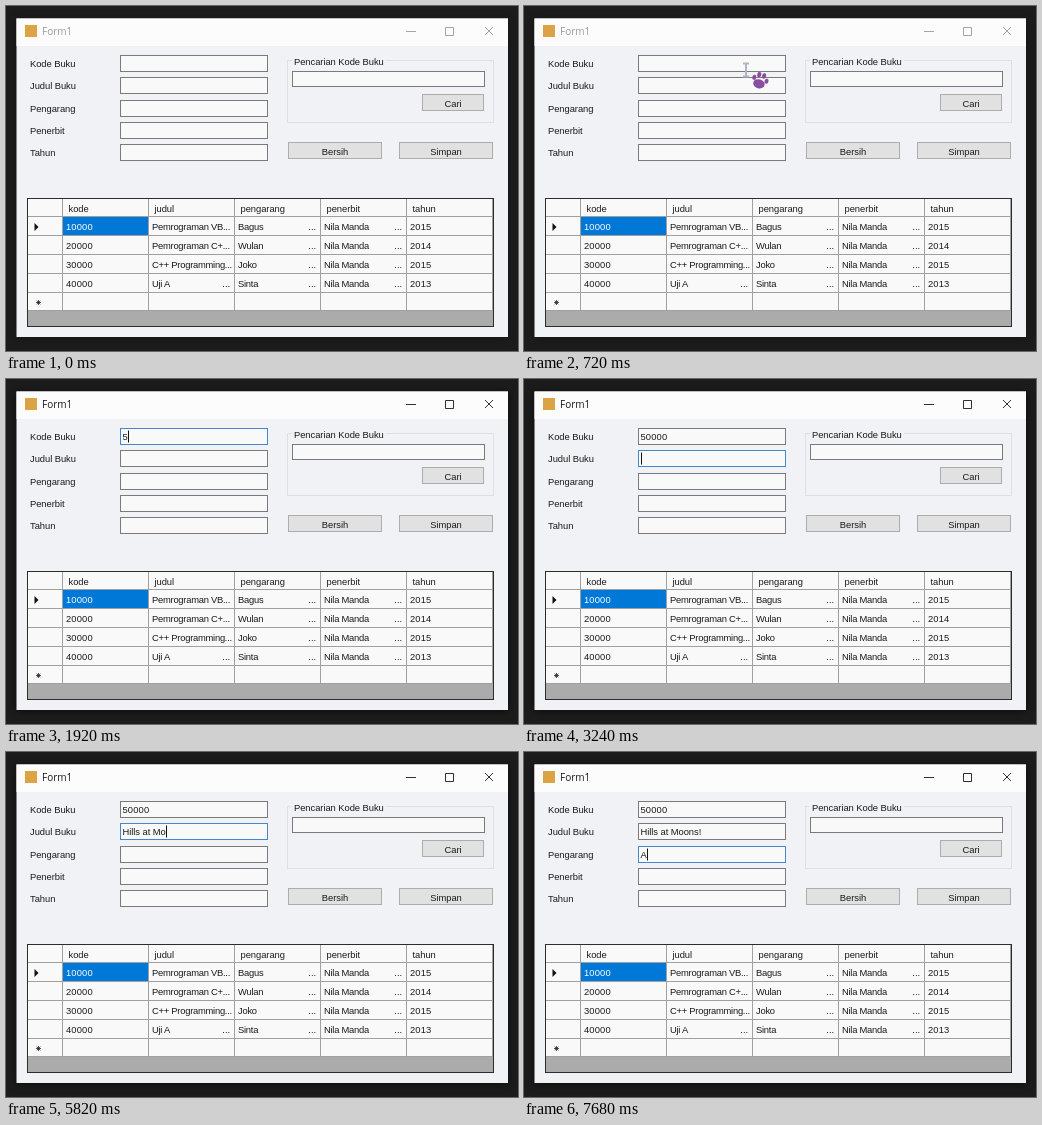
Animation, 512 px wide and 345 px high, one loop 8000 ms. Source, as an HTML page:

```html
<!DOCTYPE html>
<html lang="id">
<head>
<meta charset="utf-8">
<title>Form1</title>
<style>
html, body { margin: 0; width: 100%; height: 100%; overflow: hidden; background: #1c1c1c; }
svg { display: block; width: 512px; height: 345px; }
text { font: 9.4px "Liberation Sans", Arial, sans-serif; letter-spacing: -.05px; white-space: pre; fill: #1a1a1a; }
.cell { letter-spacing: -.25px; }
.num { letter-spacing: .15px; }
.title { font: 10px "Open Sans", "Noto Sans", sans-serif; letter-spacing: 0; }
</style>
</head>
<body>
<svg id="stage" viewBox="0 0 512 345"></svg>
<script>
const LOOP = 8000, STEP = 60, BLINK = 530;
const FORM = '#f0f2f5', PAPER = '#f9f9f9';
const stage = document.getElementById('stage');

function add(tag, attrs, parent = stage) {
  const el = document.createElementNS('http://www.w3.org/2000/svg', tag);
  for (const k in attrs) el.setAttribute(k, attrs[k]);
  return parent.appendChild(el);
}
const fillRect = (x, y, width, height, fill) => add('rect', { x, y, width, height, fill });
const box = (x, y, width, height, fill, stroke) =>
  add('rect', { x: x + .5, y: y + .5, width: width - 1, height: height - 1, fill, stroke });
const path = (d, attrs, parent) => add('path', { d, fill: 'none', ...attrs }, parent);
function text(x, y, content, attrs = {}) {
  const el = add('text', { x, y, ...attrs });
  el.textContent = content;
  return el;
}
function button(x, y, width, height, label) {
  box(x, y, width, height, '#e1e1e1', '#adadad');
  text(x + width / 2, y + 13, label, { 'text-anchor': 'middle' });
}

// Window frame
const frame = fillRect(10.5, 12.5, 491.5, 318.5, FORM);
fillRect(10.5, 12.5, 491.5, 27.5, '#fcfcfc');
fillRect(19, 19, 12, 12, '#dca344');
const title = text(36, 29, 'Form1', { class: 'title' });
const controls = path('M400 25.5h10M439.5 21.5h8v8h-8zM479 21l8 8M487 21l-8 8', { 'stroke-width': .9 });

// Input fields
const labels = ['Kode Buku', 'Judul Buku', 'Pengarang', 'Penerbit', 'Tahun'];
const fields = labels.map((label, i) => {
  const y = Math.round(49 + i * 22.25);
  text(24, y + 12, label);
  return {
    y,
    rect: box(114, y, 148, 17, PAPER, '#7a7a7a'),
    text: text(116.5, y + 12, '', i ? {} : { class: 'num' })
  };
});

// Search group and buttons
box(281, 54, 207, 63, 'none', '#dcdfe4');
fillRect(286, 50, 94, 10, FORM);
text(288, 58.5, 'Pencarian Kode Buku');
box(286, 65, 193, 16, PAPER, '#7a7a7a');
button(416, 88, 62, 17, 'Cari');
button(282, 136, 94, 17, 'Bersih');
button(393, 136, 94, 17, 'Simpan');

// Data grid
const cols = [56, 142, 228, 314, 400, 486];
const rows = [210, 229, 248, 267, 286, 304];
const data = [
  ['10000', 'Pemrograman VB...', 'Bagus', 'Nila Manda', '2015'],
  ['20000', 'Pemrograman C+...', 'Wulan', 'Nila Manda', '2014'],
  ['30000', 'C++ Programming...', 'Joko', 'Nila Manda', '2015'],
  ['40000', 'Uji A', 'Sinta', 'Nila Manda', '2013']
];
fillRect(21, 192, 467, 129, '#ababab');
fillRect(22, 193, 465, 111, PAPER);
fillRect(57, 211, 85, 18, '#0078d7');
path(cols.map(x => `M${x}.5 193V304`).join('') + rows.map(y => `M22 ${y}.5H487`).join(''),
  { stroke: '#a0a0a0' });
box(21, 192, 467, 129, 'none', '#2c2c2c');
['kode', 'judul', 'pengarang', 'penerbit', 'tahun'].forEach((name, c) =>
  text(cols[c] + 6.5, 205.5, name));
data.forEach((row, r) => row.forEach((value, c) => {
  const y = rows[r] + 14, number = c === 0 || c === 4;
  const el = text(cols[c] + 4, y, value, { class: number ? 'num' : 'cell' });
  if (!r && !c) el.style.fill = '#fff';
  if (!number && !value.endsWith('...'))
    text(cols[c + 1] - 4, y, '...', { 'text-anchor': 'end' });
}));
path('M28.5 217l4 4l-4 4z', { fill: '#111' });
path('M30 296.5h5M32.5 294v5M30.7 294.7l3.6 3.6M34.3 294.7l-3.6 3.6', { stroke: '#222', 'stroke-width': .8 });

const caret = fillRect(0, 0, 1, 12, '#111');

// Pointer: beam or arrow with a paw beside the hotspot
const pointer = add('g', {});
const beam = path('M-3-6.5H3M0-6.5V6.5M-3 6.5H3', { stroke: '#b2b4c6', 'stroke-width': 2 }, pointer);
const arrow = path('M0 0V15L3.5 11.8L6 17.5L8.3 16.5L6 11H10.5Z', { fill: '#fff', stroke: '#555', 'stroke-width': .8 }, pointer);
const paw = add('g', { fill: '#8a4d9f' }, pointer);
[[0, 4, 5.8, 4.6], [-6.2, -1, 2, 2.6], [-2.2, -5, 2, 2.8], [2.8, -5, 2, 2.8], [6.6, -.6, 2, 2.6]]
  .forEach(([cx, cy, rx, ry]) => add('ellipse', { cx, cy, rx, ry }, paw));

// Typing: when each field gains focus and when its keys land
const typing = [
  { focus: 1020, caretAt: 1200, value: '50000', keys: [1920, 2040, 2340, 2460, 2760] },
  { focus: 3000, caretAt: 3000, value: 'Hills at Moons!',
    keys: [3480, 3720, 4020, 4200, 4320, 4500, 4800, 5280, 5460, 5700, 5820, 6120, 6240, 6360, 6960] },
  { focus: 7260, caretAt: 7260, value: 'A', keys: [7680] }
];
// Pointer track: time, x, y
const track = [[60, 520, 50], [180, 470, 54], [300, 420, 62], [480, 312, 66], [660, 234, 65],
  [720, 222, 64], [840, 222, 60], [1080, 222, 60], [1320, 224, 20]];

const clamp = v => Math.max(0, Math.min(1, v));
const mix = (a, b, p) => `rgb(${a.map((v, i) => Math.round(v + (b[i] - v) * p))})`;
const gray = v => [v, v, v];
const FOCUS = [70, 134, 205];

function pointerAt(t) {
  const i = track.findIndex(k => k[0] > t);
  if (i < 0) return track[track.length - 1].slice(1);
  if (i === 0) return track[0].slice(1);
  const [t0, x0, y0] = track[i - 1], [t1, x1, y1] = track[i], p = (t - t0) / (t1 - t0);
  return [x0 + (x1 - x0) * p, y0 + (y1 - y0) * p];
}

function drawPointer(t) {
  const [x, y] = pointerAt(t);
  const inside = (left, top, width) => x >= left && x <= left + width && y >= top && y <= top + 17;
  const onText = inside(114, 49, 148) || inside(286, 65, 193);
  pointer.setAttribute('transform', `translate(${Math.round(x)} ${Math.round(y)})`);
  pointer.style.display = t >= 120 && t < 1920 ? '' : 'none';
  beam.style.display = onText ? '' : 'none';
  arrow.style.display = onText ? 'none' : '';
  paw.setAttribute('transform', `translate(${onText ? '14 10' : '15 19'}) rotate(16)`);
}

function drawField(field, entry, next, t) {
  const count = entry.keys.filter(k => k <= t).length;
  field.text.textContent = entry.value.slice(0, count);
  const enter = t < entry.focus ? 0 : clamp((t - entry.focus + STEP) / 300);
  const leave = next ? clamp((t - next.focus) / 240) : 0;
  field.rect.setAttribute('stroke', mix(gray(122), FOCUS, enter * (1 - leave)));

  if (t < entry.caretAt || next && t >= next.focus) return;
  const since = t - (count ? entry.keys[count - 1] : entry.caretAt);
  if (since % (2 * BLINK) >= BLINK) return;
  const width = count ? field.text.getComputedTextLength() : 0;
  caret.setAttribute('x', Math.round(116.5 + width));
  caret.setAttribute('y', field.y + 2.5);
  caret.style.display = '';
}

function draw(t) {
  const active = clamp((t - 1020) / 300);
  const ink = mix(gray(155), gray(25), active);
  title.style.fill = ink;
  controls.setAttribute('stroke', ink);
  frame.style.filter = `drop-shadow(0 1px 4px rgba(0,0,0,${.3 + .3 * active}))`;
  drawPointer(t);
  caret.style.display = 'none';
  typing.forEach((entry, i) => drawField(fields[i], entry, typing[i + 1], t));
}

const start = performance.now();
function tick() {
  const t = (performance.now() - start) % LOOP;
  draw(Math.floor(t / STEP) * STEP);
  requestAnimationFrame(tick);
}
tick();
</script>
</body>
</html>
```
